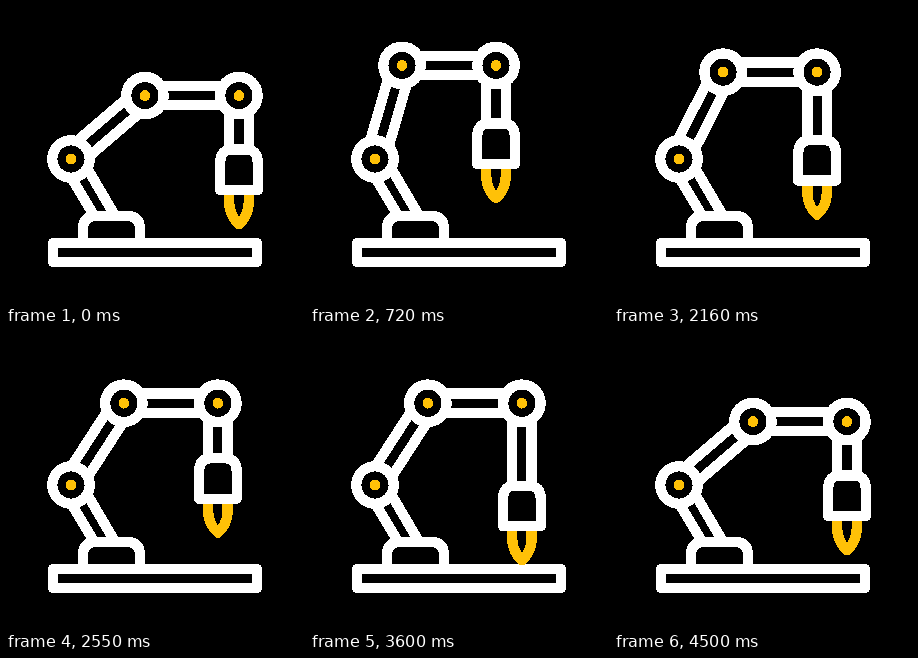
An HTML page that plays this animation: 298 px wide and 298 px high, repeating every 5.4 s.

```html
<!DOCTYPE html>
<html>
<head>
<meta charset="utf-8">
<style>
  html, body { margin: 0; width: 100%; height: 100%; overflow: hidden; background: #000; }
  svg { display: block; width: 100%; height: 100%; fill: #000; stroke: #fff; stroke-width: 10.3; stroke-linejoin: round; shape-rendering: crispEdges; }
  .amber { stroke: #ffc107; }
  .dot { fill: #ffc107; stroke: none; }
  .spark { fill: none; stroke: #ffc107; stroke-width: 11; stroke-linecap: round; }
</style>
</head>
<body>
<svg viewBox="0 0 298 298">
  <defs>
    <g id="joint"><circle r="18.7"/><circle class="dot" r="5.4"/></g>
  </defs>
  <path d="M57 157.6L87 208M73 148.4L108 208"/>
  <path d="M77 237V223Q77 210 90 210H121Q134 210 134 223V237"/>
  <rect x="47.1" y="237.1" width="203.8" height="18.8"/>
  <path id="arm" d="M-9.7 0V-97.4M9.7 0V-97.4"/>
  <use href="#joint" x="65" y="153"/>
  <g id="head">
    <path d="M0-9.7H94M0 9.7H94"/>
    <path id="rod"/>
    <g id="tool">
      <path class="amber" d="M-9.7 96V107C-9.7 117-4.5 125 0 128.5C4.5 125 9.7 117 9.7 107V96"/>
      <path d="M-18.8 94.5V67Q-18.8 54-6.8 54H6.8Q18.8 54 18.8 67V94.5Z"/>
    </g>
    <use href="#joint"/>
    <use href="#joint" x="94"/>
  </g>
  <g id="sparks">
    <path class="spark" d="M-23.5 226L-34.5 217L-38 219L-46.5 207"/>
    <path class="spark" d="M23.5 226L38 222L41 223.5L50.5 211"/>
  </g>
</svg>
<script>
const LOOP = 5400, STEP = 30, ARM = 97.4, REACH = 94;
const HOME = 49.4, LEFT = 16.1, MID = 32.9;
const $ = id => document.getElementById(id);
const move = (el, x, y, extra = '') => el.setAttribute('transform', `translate(${x} ${y})${extra}`);

// Eased progress from 0 to 1 between two times
const ease = (t, a, b) => (1 - Math.cos(Math.PI * Math.min(1, Math.max(0, (t - a) / (b - a))))) / 2;

const sparks = [...document.querySelectorAll('.spark')].map(el => ({ el, len: el.getTotalLength() }));

function drawSparks(t, start, x) {
  const head = ease(t, start, start + 330), tail = ease(t, start + 330, start + 600);
  move($('sparks'), x, 0);
  for (const { el, len } of sparks) {
    el.style.visibility = t >= start && tail < 1 ? 'visible' : 'hidden';
    el.style.strokeDasharray = `${Math.max(0.01, (head - tail) * len)} 200`;
    el.style.strokeDashoffset = -tail * len;
  }
}

function draw(t) {
  const toLeft = ease(t, 0, 660), toMid = ease(t, 1680, 2490), toHome = ease(t, 3600, 4500);
  const angle = HOME + (LEFT - HOME) * toLeft + (MID - LEFT) * toMid + (HOME - MID) * toHome;
  const drop = 39 * (ease(t, 600, 1170) - toMid) + 28.5 * (ease(t, 2490, 3000) - toHome);
  const a = angle * Math.PI / 180;
  const x = 65 + ARM * Math.sin(a), y = 153 - ARM * Math.cos(a);

  move($('arm'), 65, 153, ` rotate(${angle})`);
  move($('head'), x, y);
  move($('tool'), REACH, drop);
  $('rod').setAttribute('d', `M${REACH - 9.7} 0V${54 + drop}M${REACH + 9.7} 0V${54 + drop}`);
  if (t < 2490) drawSparks(t, 1200, 186);
  else drawSparks(t, 3000, 212);
}

const begin = performance.now();
function tick() {
  const t = (performance.now() - begin) % LOOP;
  draw(t - t % STEP);
  requestAnimationFrame(tick);
}
tick();
</script>
</body>
</html>
```
